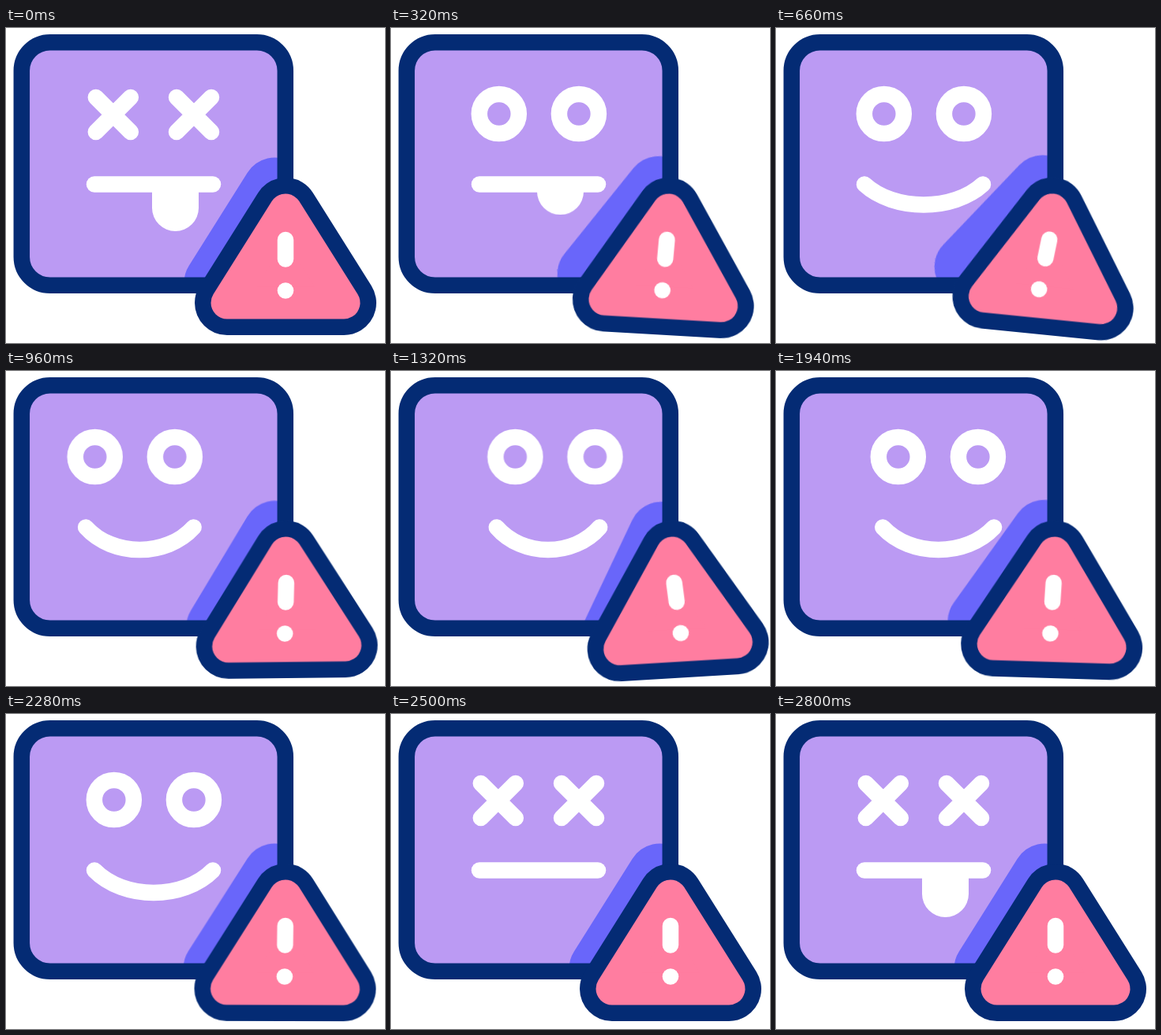
Animation of 480x400 px, one loop 3.02 s. Source, as an HTML page:

```html
<!DOCTYPE html>
<html lang="en">
<head>
<meta charset="utf-8">
<title>Error face</title>
<style>
  html, body { margin: 0; width: 100%; height: 100%; overflow: hidden; background: #fff; }
  svg { display: block; width: 480px; height: 400px; }

  .line { fill: none; stroke: #fff; stroke-width: 20.5; stroke-linecap: round; }
  .navy { fill: #042b74; stroke: #042b74; }
  .pink { fill: #ff7da0; stroke: #ff7da0; }
  .blue { fill: #6966fa; stroke: #6966fa; }
  .wide { stroke-width: 82; stroke-linejoin: round; }
  .slim { stroke-width: 41; stroke-linejoin: round; }

  .swing, .mark, .gaze, .mouth, .tongue {
    animation: swing 3020ms cubic-bezier(.37, 0, .63, 1) infinite;
  }
  .swing { transform-origin: 354px 190px; }
  .mark { transform-origin: 354px 270px; animation-delay: 100ms; }
  .gaze { animation-name: gaze; }
  .mouth { animation-name: mouth; }
  .tongue { animation-name: tongue; }
  .awake { animation: awake 3020ms step-end infinite; }
  .out { animation: out 3020ms step-end infinite; }

  /* damped pendulum, 600 ms per half swing */
  @keyframes swing {
    0% { transform: rotate(0deg); }
    19.868% { transform: rotate(6deg); }
    39.735% { transform: rotate(-4deg); }
    59.603% { transform: rotate(2deg); }
    79.47%, 100% { transform: rotate(0deg); }
  }
  @keyframes gaze {
    0%, 24.503% { transform: translateX(0); }
    37.086% { transform: translateX(-38.5px); }
    47.02%, 57.616% { transform: translateX(39.5px); }
    70.199%, 100% { transform: translateX(0); }
  }
  @keyframes mouth {
    0%, 16.556%, 82.781%, 100% { d: path("M112 198.5C149.5 198.5 224.5 198.5 262 198.5"); }
    23.179%, 25.166%, 70.861%, 76.159% { d: path("M112 198.5C149.5 236.5 224.5 236.5 262 198.5"); }
    37.748% { d: path("M92 198.5C123.3 236.5 186 236.5 217.3 198.5"); }
    47.682%, 58.278% { d: path("M155.2 198.5C188.5 236.5 255 236.5 288.2 198.5"); }
  }
  @keyframes tongue {
    0%, 6.623% { transform: translateY(0); }
    16.556%, 82.781% { transform: translateY(-59.5px); }
    92.715%, 100% { transform: translateY(0); }
  }
  @keyframes awake {
    0% { visibility: hidden; }
    6.623% { visibility: visible; }
    82.781%, 100% { visibility: hidden; }
  }
  @keyframes out {
    0% { visibility: visible; }
    6.623% { visibility: hidden; }
    82.781%, 100% { visibility: visible; }
  }
</style>
</head>
<body>
<svg viewBox="0 0 480 400">
  <defs>
    <rect id="box" x="19.8" y="18.3" width="334" height="308.5" rx="36"/>
    <path id="tri" d="M354 231L428 349H280Z"/>
    <path id="cross" d="M-22 -22L22 22M22 -22L-22 22"/>
    <clipPath id="inside"><use href="#box"/></clipPath>
    <clipPath id="below"><rect x="170" y="198.5" width="90" height="80"/></clipPath>
  </defs>

  <use href="#box" fill="#bb9af3"/>
  <g clip-path="url(#inside)">
    <!-- nested swings double the angle of the shadow -->
    <g class="swing"><g class="swing">
      <use href="#tri" class="blue wide" x="-13.5" y="-25.5"/>
    </g></g>
  </g>
  <use href="#box" fill="none" stroke="#042b74" stroke-width="20.5"/>

  <g class="line out">
    <use href="#cross" x="135.8" y="110"/>
    <use href="#cross" x="238" y="110"/>
  </g>
  <g class="line awake">
    <g class="gaze">
      <circle cx="136.8" cy="109" r="25"/>
      <circle cx="237.9" cy="109" r="25"/>
    </g>
  </g>

  <g clip-path="url(#below)">
    <path class="tongue" fill="#fff" d="M185 139V228.5a29.5 29.5 0 0 0 59 0V139Z"/>
  </g>
  <path class="line mouth" d="M112 198.5C149.5 198.5 224.5 198.5 262 198.5"/>

  <g class="swing">
    <use href="#tri" class="navy wide"/>
    <use href="#tri" class="pink slim"/>
    <g class="mark">
      <path class="line" d="M354 269V293.5"/>
      <circle cx="354" cy="333.5" r="10.3" fill="#fff"/>
    </g>
  </g>
</svg>
</body>
</html>
```
